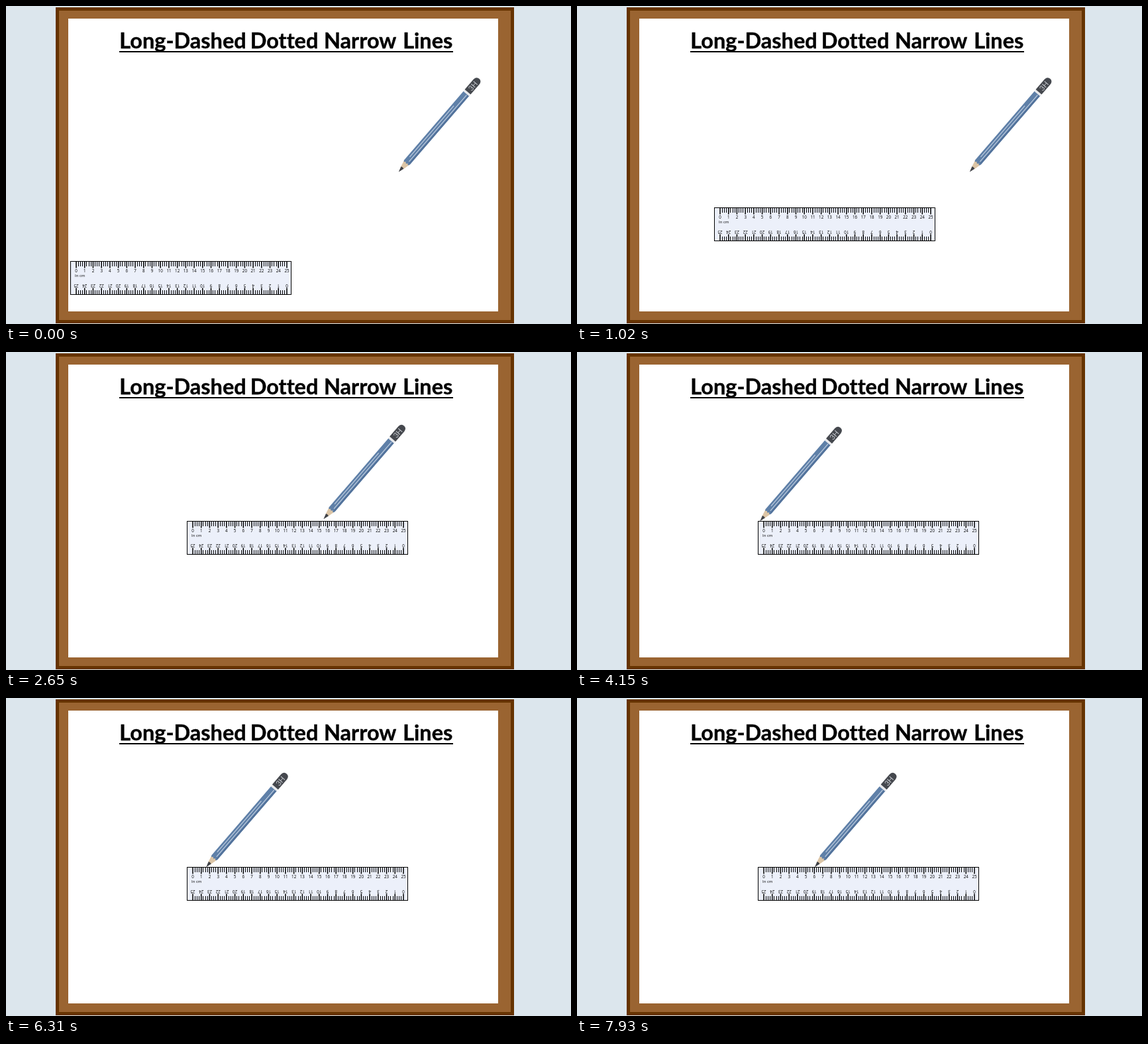
These frames come from a looping animation (853x480 px, 7990 ms). An HTML page:

```html
<!DOCTYPE html>
<html lang="en">
<head>
<meta charset="utf-8">
<title>Long-Dashed Dotted Narrow Lines</title>
<style>
  html, body { margin: 0; width: 100%; height: 100%; overflow: hidden; background: #dce6ed; }
  svg { display: block; width: 100%; height: 100%; }
  .title { font: 700 32.5px Lato, sans-serif; font-variant-ligatures: none; stroke: #000; stroke-width: .4; }
  .numbers { font: 6.2px "Open Sans", "Noto Sans", sans-serif; text-anchor: middle; }
  .unit { font: 6px "Open Sans", "Noto Sans", sans-serif; }
  .grade { font: 11px Lato, sans-serif; text-anchor: middle; fill: #c9ccd2; }
  .crisp { shape-rendering: crispEdges; }
</style>
</head>
<body>
<svg viewBox="0 0 853 480">
  <rect width="853" height="480" fill="#dce6ed"/>
  <rect x="77.5" y="4.5" width="687" height="472" fill="#9a6431" stroke="#663300" stroke-width="5"/>
  <rect x="94" y="19" width="649" height="442" fill="#fff"/>
  <text class="title" y="64"><tspan x="171.2">Long-Dashed</tspan> <tspan x="368.7">Dotted</tspan> <tspan x="480">Narrow</tspan> <tspan x="599.2">Lines</tspan></text>
  <rect x="171" y="68" width="504" height="2"/>

  <g id="ruler">
    <rect class="crisp" width="333" height="50" fill="#ecf0fa" stroke="#000"/>
    <g id="scale">
      <path id="minor" class="crisp" stroke="#000"/>
      <path id="major" stroke="#000" stroke-width="1.5"/>
      <g id="numbers" class="numbers"></g>
    </g>
    <use href="#scale" transform="rotate(180 167.5 25)"/>
    <text class="unit" x="6.5" y="23.5">In cm</text>
  </g>

  <g id="pencil">
    <g transform="rotate(-49.2)">
      <path d="M8 -2.6L20 -5.5Q17 -3 20 -2Q17 0 20 2Q17 3 20 5.5L8 2.6Z" fill="#dcc5a6"/>
      <path d="M0 0L8.5 -2.6Q10 0 8.5 2.6Z" fill="#404247"/>
      <path d="M157 -5.5H19Q15 -4 19 -2Q15 0 19 2Q15 4 19 5.5H157Z" fill="#5f80a8"/>
      <path d="M20 4.4H157" stroke="#52729b" stroke-width="2.2"/>
      <path d="M28 -2.2H130M22 1.7H155" stroke="#c3d0e2" stroke-width="1.1"/>
      <rect x="156" y="-5.6" width="4" height="11.2" fill="#e8e9ec"/>
      <path d="M159.5 -5.9H180Q186 -5.2 186 0T180 5.9H159.5Z" fill="#45484e"/>
      <text class="grade" x="171.5" y="4">3H</text>
    </g>
  </g>
</svg>
<script>
  const LOOP = 7990, STEP = 60;
  const byId = id => document.getElementById(id);
  const ruler = byId('ruler'), pencil = byId('pencil');

  // Scale: four divisions per centimetre
  const CM = 12.72, ORIGIN = 8.5;
  let minor = '', major = '', numbers = '';
  for (let i = 0; i <= 100; i++) {
    const x = (ORIGIN + i * CM / 4).toFixed(2);
    if (i % 4) {
      minor += `M${x} 0V7`;
    } else {
      major += `M${x} 0V10`;
      numbers += `<text x="${x}" y="16">${i / 4}</text>`;
    }
  }
  byId('minor').setAttribute('d', minor);
  byId('major').setAttribute('d', major);
  byId('numbers').innerHTML = numbers;

  const easeInOut = (t, start, duration) => {
    const u = Math.min(1, Math.max(0, (t - start) / duration));
    return u < 0.5 ? 2 * u * u : 1 - 2 * (1 - u) ** 2;
  };
  const place = (node, x, y) =>
    node.setAttribute('transform', `translate(${x.toFixed(2)} ${y.toFixed(2)})`);

  function draw(now) {
    const time = now % LOOP;
    const shift = time < 1800 ? 0 : 10;
    const t = Math.floor((time - shift) / STEP) * STEP + shift;

    const slide = easeInOut(t, 53, 1706);
    place(ruler, 97.5 + Math.round(176 * slide), 385.5 - Math.round(130 * slide));

    const approach = easeInOut(t, 1969, 1609);
    const stroke = 6.1 * Math.max(0, t / 1000 - 4.25) ** 2;
    place(pencil, 592.8 - 316.5 * approach + stroke, 250.5 + 4.7 * approach);
  }

  const begin = performance.now();
  function frame() {
    draw(performance.now() - begin);
    requestAnimationFrame(frame);
  }
  frame();
</script>
</body>
</html>
```
